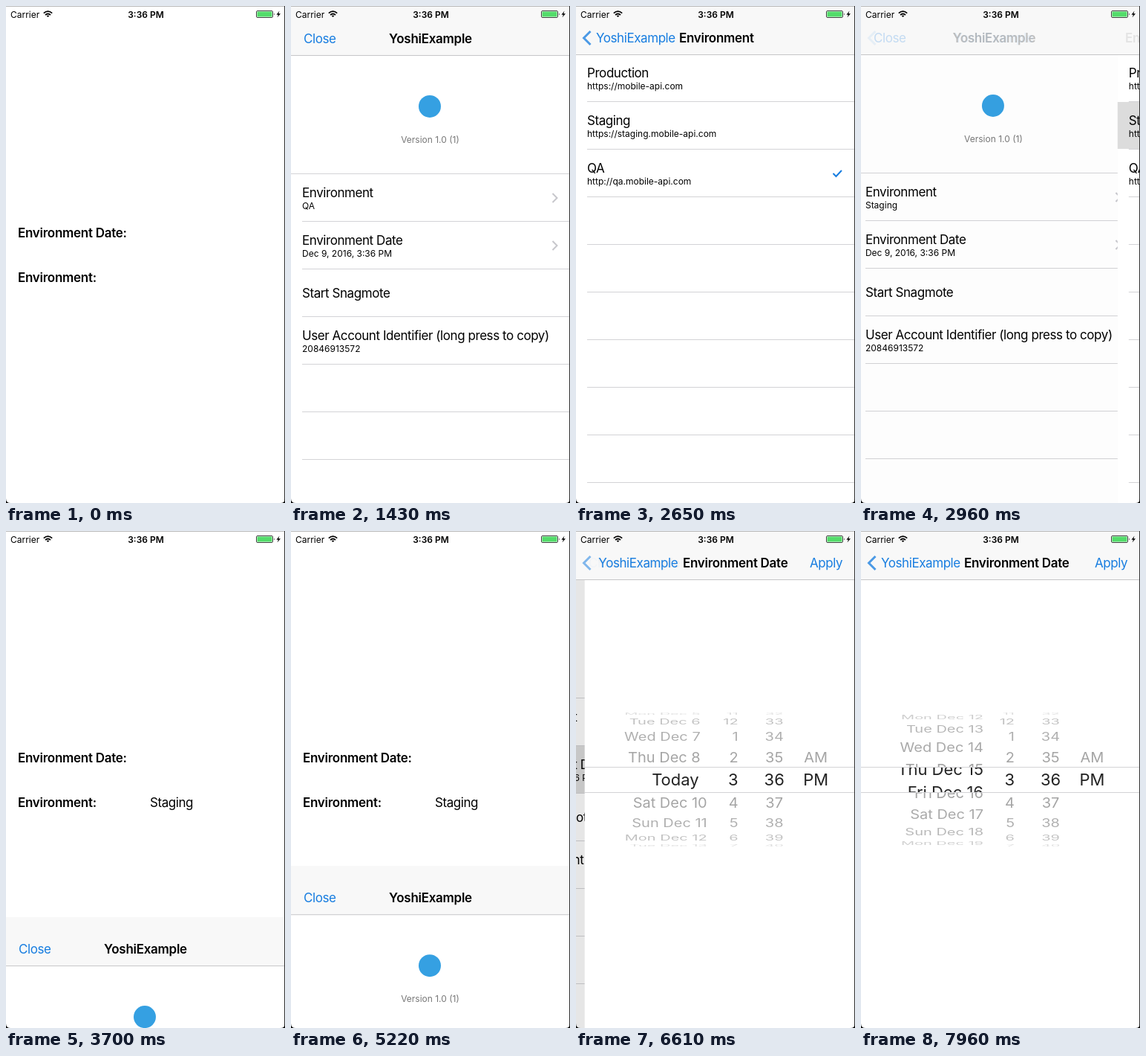
An HTML page that plays this animation: 376 px wide and 668 px high, repeating every 8 s.

```html
<!DOCTYPE html>
<html lang="en">
<head>
<meta charset="utf-8">
<title>Debug menu</title>
<style>
html, body { margin: 0; width: 100%; height: 100%; overflow: hidden; background: #fff; }
svg { display: block; width: 100%; height: 100%; font-family: Inter, Roboto, sans-serif; }
text { white-space: pre; }
.body { font-size: 17px; letter-spacing: -.43px; }
.bold { font-weight: 600; }
.body.bold { letter-spacing: -.28px; }
.small { font-size: 12px; }
.blue { fill: #177de0; }
.mid { text-anchor: middle; }
.end { text-anchor: end; }
.wheel { font-size: 20px; }
.lens .wheel { font-size: 22px; }
.line { fill: none; stroke: #d3d3d6; }
.arrow { fill: none; stroke: #c7c7cc; stroke-width: 2; }
</style>
</head>
<body>
<svg viewBox="0 0 376 668">
  <defs>
    <clipPath id="band"><path d="M0 318H376V351H0Z"/></clipPath>
    <clipPath id="rest"><path d="M0 240H376V317H0ZM0 352H376V430H0Z"/></clipPath>
  </defs>
  <rect width="376" height="668" fill="#fff"/>
  <text class="body bold" x="16" y="311">Environment Date:</text>
  <text class="body bold" x="16" y="371">Environment:</text>
  <text class="body" x="194" y="371" id="value">Staging</text>

  <g id="modal">
    <rect width="376" height="668" fill="#fff"/>
    <g id="menu"></g>
    <rect id="dim" y="65" width="376" height="603"/>
    <g id="envs"></g>
    <g id="dates">
      <rect y="65" width="376" height="603" fill="#fff"/>
      <g id="wheels" clip-path="url(#rest)" fill-opacity=".37"></g>
      <g id="lens" class="lens" clip-path="url(#band)" fill="#222"></g>
      <path class="line" d="M0 317.5H376M0 351.5H376"/>
    </g>
    <rect width="376" height="65" fill="#f8f8f8"/>
    <path d="M0 65.5H376" stroke="#c6c6c8"/>
    <text id="close" class="body blue" x="17" y="49">Close</text>
    <text id="title" class="body bold mid" x="188" y="49">YoshiExample</text>
    <path id="chevron" d="M19.5 34L10.5 43L19.5 52" fill="none" stroke="#177de0" stroke-width="3"/>
    <text id="back" class="body blue" x="27" y="49">YoshiExample</text>
    <text id="subtitle" class="body bold" x="139" y="49"></text>
    <text id="apply" class="body blue" x="315" y="49">Apply</text>
  </g>

  <text class="small" x="6" y="16">Carrier</text>
  <g fill="none" stroke="#000" stroke-width="1.7">
    <path d="M50.8 9.6Q56.5 4.6 62.2 9.6M53 12Q56.5 9 60 12"/>
    <path d="M55 13L56.5 14.8L58 13Z" fill="#000" stroke-width=".6"/>
  </g>
  <text class="small bold mid" x="188.5" y="16">3:36 PM</text>
  <rect x="337.5" y="6.5" width="22" height="9" rx="1.5" fill="#fff" stroke="#444"/>
  <rect x="338.5" y="7.5" width="20" height="7" rx=".5" fill="#53dc6a"/>
  <path d="M361 9.5Q362.5 11 361 12.5Z"/>
  <path d="M368.5 6.5L364.5 11.7H367L365.5 15.5L370 10.3H367.3Z"/>
  <path d="M0 .5H376" stroke="#bbb"/>
  <path d="M375.5 0V668" stroke="#333"/>
  <path d="M0 662Q0 668 6 668H0ZM376 662Q376 668 370 668H376Z"/>
</svg>
<script>
const LOOP = 8000, W = 376, H = 668;
const $ = id => document.getElementById(id);
const clamp = v => Math.max(0, Math.min(1, v));

// Critically damped spring, first seen at `at`, already `lead` ms under way
function spring(t, at, lead) {
  if (t < at) return 0;
  const x = (t - at + lead) * 0.01826;
  return 1 - Math.exp(-x) * (1 + x);
}

const text = (cls, x, y, s, id = "") => `<text class="${cls}" x="${x}" y="${y}" id="${id}">${s}</text>`;

function row(top, title, sub, id) {
  const cell = `<rect id="${id}Cell" y="${top}" width="${W}" height="63" fill="#dcdcdc"/>`;
  return cell + text("body", 15, top + (sub ? 31 : 38), title) +
    (sub ? text("small", 15, top + 47, sub, id + "Sub") : "");
}

function rules(from) {
  let d = "";
  for (let y = from; y < H; y += 64) d += `M15 ${y}H${W}`;
  return `<path class="line" d="${d}"/>`;
}

const sheet = `<rect y="65" width="${W}" height="603" fill="#fff"/>`;

$("menu").innerHTML = sheet +
  `<circle cx="187" cy="134" r="15" fill="#35a0e2"/>` +
  `<g fill="#777">${text("small mid", 187.5, 183, "Version 1.0 (1)")}</g>` +
  row(225, "Environment", "QA", "env") +
  row(289, "Environment Date", "Dec 9, 2016, 3:36 PM", "date") +
  row(353, "Start Snagmote", "", "start") +
  row(417, "User Account Identifier (long press to copy)", "20846913572", "user") +
  `<path class="line" d="M0 224.5H${W}"/>` + rules(288.5) +
  `<path class="arrow" d="M352.5 251L358.5 257L352.5 263M352.5 315L358.5 321L352.5 327"/>`;

$("envs").innerHTML = sheet +
  row(65, "Production", "https://mobile-api.com", "prod") +
  row(129, "Staging", "https://staging.mobile-api.com", "staging") +
  row(193, "QA", "http://qa.mobile-api.com", "qa") + rules(128.5) +
  `<path d="M346.5 225L350.5 229L358 221" fill="none" stroke="#177de0" stroke-width="2"/>`;

const DAYS = ["Sun", "Mon", "Tue", "Wed", "Thu", "Fri", "Sat"];
const columns = [
  { x: 165, cls: "end", label: i => i ? `${DAYS[(i + 12) % 7]} Dec ${9 + i}` : "Today",
    shift: i => i > 0 ? 0 : i < 0 ? -9 : -11 },
  { x: 207, cls: "end", label: i => (i + 14) % 12 + 1 },
  { x: 255.5, cls: "mid", label: i => 36 + i },
  { x: 311.5, cls: "mid", label: i => ["AM", "PM"][i + 1] || "" }
];

// Rows of a wheel seen from the front: 20 degrees apart on a radius of 90
function wheel(col, pos) {
  let out = "";
  for (let i = Math.ceil(pos - 4.4); i <= pos + 4.4; i++) {
    const a = (i - pos) * Math.PI / 9, c = Math.cos(a);
    const x = col.x + (col.shift ? col.shift(i) : 0), y = 334.5 + 90 * Math.sin(a);
    out += `<g transform="translate(${x} ${y}) scale(1 ${c})" opacity="${Math.pow(c, 0.6)}">` +
      text("wheel " + col.cls, 0, 7.5, col.label(i)) + "</g>";
  }
  return out;
}

let shownPos = -1;
function drawWheels(pos) {
  if (pos === shownPos) return;
  shownPos = pos;
  const rows = columns.map((col, n) => wheel(col, n ? 0 : pos)).join("");
  $("wheels").innerHTML = rows;
  $("lens").innerHTML = rows;
}

const move = (id, x, y = 0) => $(id).setAttribute("transform", `translate(${x} ${y})`);
const fade = (id, v) => $(id).setAttribute("opacity", v);
const show = (id, on) => $(id).style.display = on ? "" : "none";

function draw(t) {
  const up = spring(t, 960, 12) - spring(t, 3570, 25) + spring(t, 5220, 63);
  move("modal", 0, H * (1 - up));
  show("value", t >= 3570);

  const late = t >= 4500, popping = t >= 2740 && !late;
  const p = late ? spring(t, 6350, 30) : spring(t, 1910, 20) - spring(t, 2740, 7);
  const q = popping ? 1 - p : p;
  const enter = clamp((q - 0.905) / 0.063), leave = 1 - q;
  const root = popping ? enter : leave, detail = popping ? leave : enter;

  move("menu", -0.3 * W * p);
  fade("dim", 0.1 * p);
  move("envs", W * (1 - p));
  move("dates", W * (1 - p));
  show("envs", !late);
  show("dates", late);

  move("title", -107 * p);
  move("back", 107 * (1 - p));
  move("subtitle", (late ? 160 : 236) * (1 - p));
  fade("title", root);
  fade("close", root);
  fade("back", detail);
  fade("subtitle", detail);
  fade("chevron", popping ? leave : clamp((q - 0.9) / 0.13));
  fade("apply", late ? detail : 0);
  $("subtitle").textContent = late ? "Environment Date" : "Environment";
  $("envSub").textContent = t < 2740 ? "QA" : "Staging";

  show("envCell", t >= 1910 && t < 2740);
  show("dateCell", t >= 6040);
  show("stagingCell", popping);

  const u = clamp((t - 7150) / 810);
  drawWheels(6.46 * (0.5 * u + 0.5 * u * u * (3 - 2 * u)));
}

for (const id of ["prod", "qa", "start", "user"]) show(id + "Cell", false);

const begin = performance.now();
function tick() {
  draw((performance.now() - begin) % LOOP);
  requestAnimationFrame(tick);
}
tick();
</script>
</body>
</html>
```
